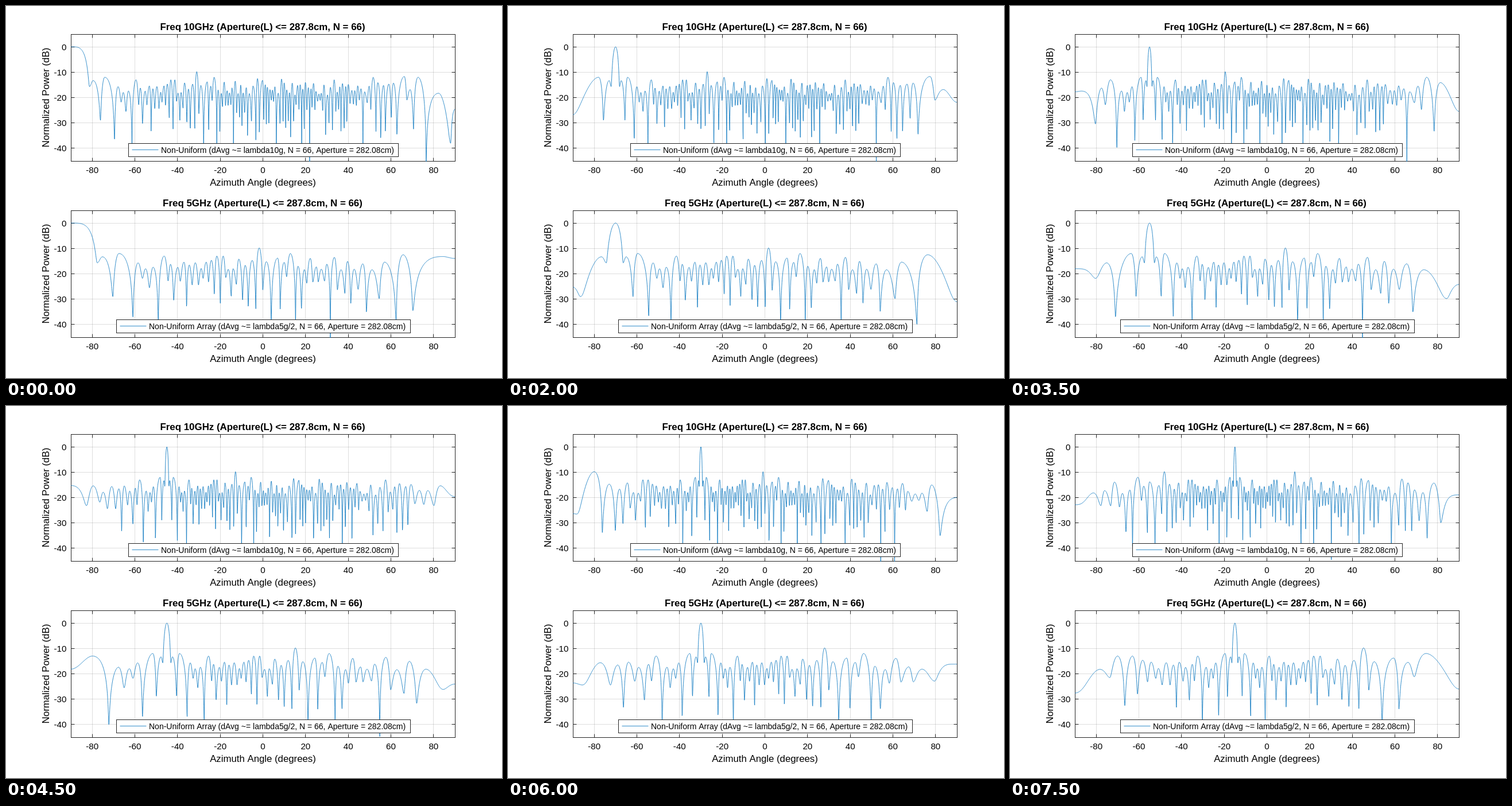
An HTML page with a canvas for the animation above (8 s loop, 864x648 px).

```html
<!DOCTYPE html>
<html>
<head>
<meta charset="utf-8">
<style>
html, body { margin: 0; width: 100%; height: 100%; overflow: hidden; background: #fff; }
canvas { display: block; }
</style>
</head>
<body>
<canvas width="864" height="648"></canvas>
<script>
const ctx = document.querySelector('canvas').getContext('2d');
const FONT = '"Liberation Sans", Arial, sans-serif';
const INK = '#262626', GRID = 'rgba(38,38,38,.15)', BLUE = '#0072bd';
const LEFT = 113, RIGHT = 782, HEIGHT = 221, DB = HEIGHT / 50;

// Outstanding peaks and nulls of the array factor: [1000 * steering offset, loss in dB].
const keys = [
  [16.5, 13.3], [29.2, 29], [38.1, 12], [63.1, 37], [73.6, 15.7], [83.3, 21.8], [90.4, 18],
  [99.8, 25.5], [122.5, 40], [138.7, 13], [316, 13], [340.4, 13], [402, 14.2], [440.2, 33],
  [484.8, 9.8], [499.5, 26.5], [533.9, 40], [560, 13.8], [611.4, 12], [632, 40], [689, 13.9],
  [762, 46], [776, 13.5], [874.5, 35], [919.3, 15.4], [943.4, 40], [955.7, 12.5],
  [970.7, 34.5], [997.7, 13.2], [1109.6, 40], [1152, 12.7], [1225.2, 36], [1312.1, 46],
  [1372.9, 46], [1490.5, 35], [1550.6, 13], [1729.9, 46], [1784.7, 12], [1821.5, 37],
  [1889.5, 34.5], [1915.7, 11.7], [1954.8, 12], [1972.4, 46], [1991.2, 18.3], [1999.4, 38],
  [2005, 38]
];
const SPACING = 9.2;

let seed = 66;
const random = () => (seed = seed * 16807 % 2147483647) / 2147483647;
const isPeak = loss => loss < 20;

// Between the outstanding points, ordinary peaks and nulls alternate at random heights.
function buildLobes() {
  const lobes = [[0, 0], [11.6, 15.7], keys[0]];
  for (let k = 1; k < keys.length; k++) {
    const [[w0, l0], [w1, l1]] = [keys[k - 1], keys[k]];
    const steps = (w1 - w0) / SPACING;
    const n = isPeak(l0) === isPeak(l1)
      ? 2 * Math.max(1, Math.floor(steps / 2))
      : 1 + 2 * Math.max(0, Math.floor((steps - 1) / 2));
    let peak = isPeak(l0);
    for (let i = 1; i < n; i++) {
      peak = !peak;
      const w = w0 + (w1 - w0) * (i + (random() - 0.5) * 0.4) / n;
      lobes.push([w, peak ? 14 + 5 * random() : 21 + 13 * random() ** 1.5]);
    }
    lobes.push(keys[k]);
  }
  return lobes;
}
const lobes = buildLobes();

const sin = deg => Math.sin(deg * Math.PI / 180);
const power = loss => 10 ** (-loss / 10);

// Power swings as a cosine from one extreme to the next.
function patternDb(offset) {
  const w = Math.abs(offset) * 1000;
  const i = Math.max(1, lobes.findIndex(p => p[0] >= w));
  const [[w0, l0], [w1, l1]] = [lobes[i - 1], lobes[i]];
  const k = (1 - Math.cos(Math.PI * (w - w0) / (w1 - w0))) / 2;
  return 10 * Math.log10(power(l0) + (power(l1) - power(l0)) * k);
}

const xAt = deg => (LEFT + RIGHT) / 2 + deg * (RIGHT - LEFT) / 180;
const snap = v => Math.floor(v) + 0.5;

function line(x0, y0, x1, y1, color, width = 1) {
  ctx.strokeStyle = color;
  ctx.lineWidth = width;
  ctx.beginPath();
  ctx.moveTo(snap(x0), snap(y0));
  ctx.lineTo(snap(x1), snap(y1));
  ctx.stroke();
}

function box(x, y, w, h) {
  ctx.strokeStyle = INK;
  ctx.lineWidth = 1;
  ctx.strokeRect(snap(x), snap(y), w, h);
}

function text(str, x, y, size, align = 'center', weight = '') {
  ctx.font = `${weight} ${size}px ${FONT}`;
  ctx.textAlign = align;
  ctx.fillStyle = '#000';
  ctx.fillText(str, x, y);
}

function chart(top, title, legend, legendX, scale, steer) {
  const bottom = top + HEIGHT;
  const yAt = db => top + (5 - db) * DB;

  for (let d = -80; d <= 80; d += 20) {
    const x = xAt(d);
    line(x, top, x, bottom, GRID);
    line(x, top, x, top + 6, INK);
    line(x, bottom, x, bottom - 6, INK);
    text(d, x, bottom + 21.2, 15.2);
  }
  for (let d = -40; d <= 0; d += 10) {
    const y = yAt(d);
    line(LEFT, y, RIGHT, y, GRID);
    line(LEFT, y, LEFT + 6, y, INK);
    line(RIGHT, y, RIGHT - 6, y, INK);
    text(d, 105.5, y + 5.5, 15.2, 'right');
  }
  box(LEFT, top, RIGHT - LEFT, HEIGHT);

  ctx.save();
  ctx.beginPath();
  ctx.rect(LEFT, top, RIGHT - LEFT, HEIGHT + 1);
  ctx.clip();
  ctx.beginPath();
  for (let i = -900; i <= 900; i++) {
    const deg = i / 10;
    ctx.lineTo(xAt(deg), yAt(patternDb(scale * (sin(deg) - sin(steer)))));
  }
  ctx.strokeStyle = BLUE;
  ctx.lineWidth = 0.8;
  ctx.lineJoin = 'round';
  ctx.stroke();
  ctx.restore();

  const legendY = top + 190, legendW = 2 * (448 - legendX);
  ctx.fillStyle = '#fff';
  ctx.fillRect(legendX, legendY, legendW, 23);
  box(legendX, legendY, legendW, 23);
  line(legendX + 6, legendY + 11, legendX + 52, legendY + 11, BLUE, 0.8);
  text(legend, legendX + 57, legendY + 16.5, 14, 'left');

  text(title, 447, top - 6.8, 16.9, 'center', 'bold');
  text('Azimuth Angle (degrees)', 447.5, bottom + 43, 16.8);
  ctx.save();
  ctx.translate(75, top + HEIGHT / 2);
  ctx.rotate(-Math.PI / 2);
  text('Normalized Power (dB)', 0, 0, 16.8);
  ctx.restore();
}

let shown = -1;
function frame() {
  const step = Math.floor(performance.now() % 8000 / 500);
  if (step !== shown) {
    shown = step;
    const steer = -90 + step * 5;
    ctx.fillStyle = '#fff';
    ctx.fillRect(0, 0, 864, 648);
    chart(49, 'Freq 10GHz (Aperture(L) <= 287.8cm, N = 66)',
      'Non-Uniform (dAvg ~= lambda10g, N = 66, Aperture = 282.08cm)', 213, 1, steer);
    chart(356, 'Freq 5GHz (Aperture(L) <= 287.8cm, N = 66)',
      'Non-Uniform Array (dAvg ~= lambda5g/2, N = 66, Aperture = 282.08cm)', 192, 0.5, steer);
  }
  requestAnimationFrame(frame);
}
frame();
</script>
</body>
</html>
```
